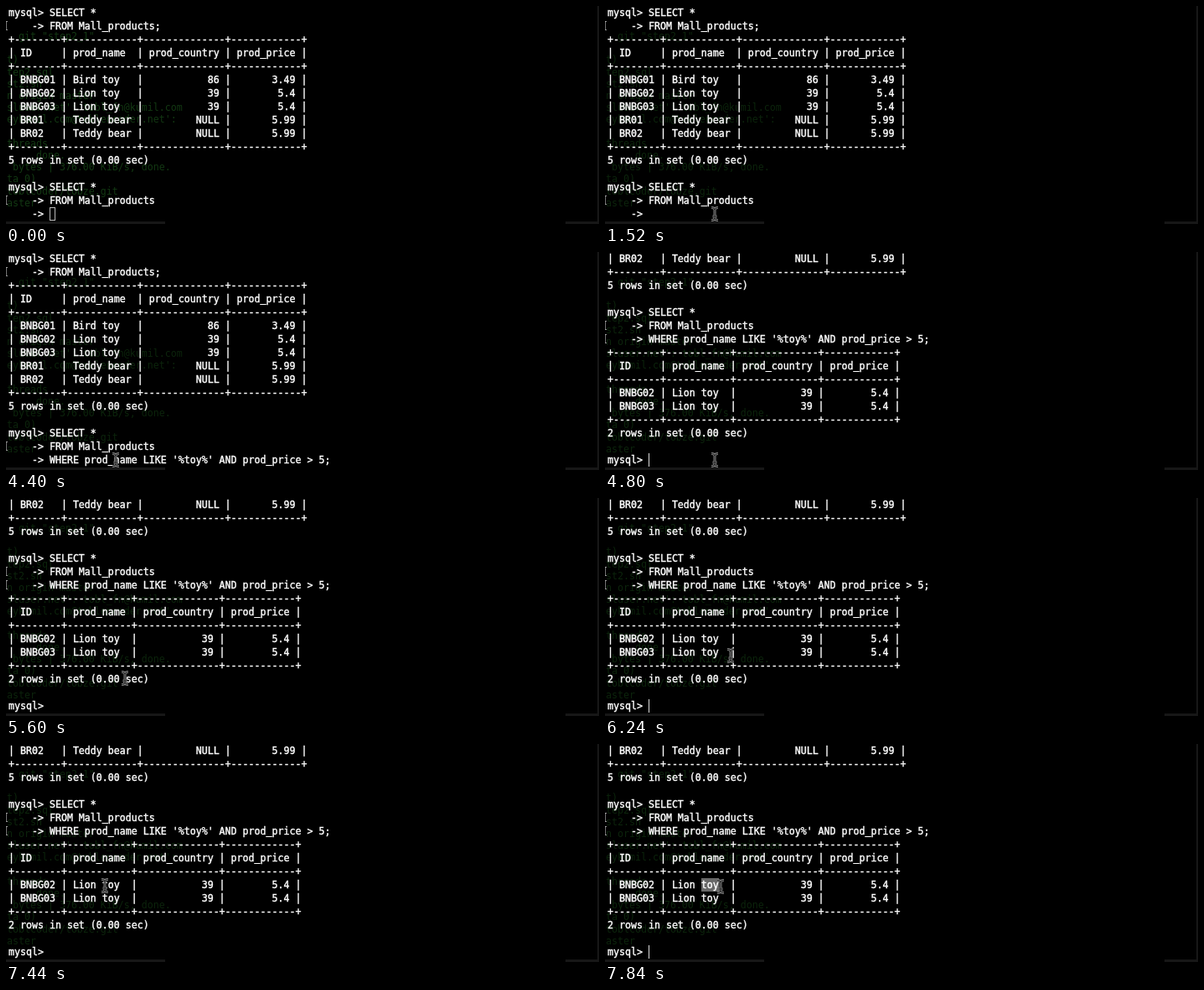
An HTML page that plays this animation: 708x260 px, repeating every 8 s.

```html
<!DOCTYPE html>
<html lang="en">
<head>
<meta charset="utf-8">
<title>Terminal session</title>
<style>
  html, body { margin: 0; width: 100%; height: 100%; overflow: hidden; background: #000; }
  #stage { position: relative; width: 708px; height: 260px; overflow: hidden; background: #000; }
  #stage > * { position: absolute; }
  pre { margin: 0; font: 11.628px/16px "DejaVu Sans Mono", monospace; }
  #backdrop { left: 1px; top: 29px; line-height: 14.2px; color: #123812; }
  .edge { background: #171717; }
  .foot { top: 257px; height: 3px; }
  #selection { left: 115px; top: 160px; height: 16px; background: #686868; }
  #screen { left: 3px; top: 0; color: #fff; -webkit-text-stroke: 0.4px #fff; }
  #marks { left: -3px; top: 0; color: #aaa; }
  #caret { top: 240px; height: 16px; box-sizing: border-box; }
  #mouse { left: -6px; top: -10px; fill: none; }
</style>
</head>
<body>
<div id="stage">
  <pre id="backdrop">  git "step2_1"

t)
tep2.sql
st2.sh
n origin master
sluser.net': tobl_fn@kumil.com
eykumil.com@toblencoder.net':

threads
     done.
 bytes | 376.00 KiB/s, done.
ta 0)
toblcoder/tobze.git
aster</pre>
  <div class="edge foot" style="left:0;width:190px"></div>
  <div class="edge foot" style="right:0;width:40px"></div>
  <div class="edge" style="right:0;width:2px;height:260px"></div>
  <div id="selection"></div>
  <pre id="marks"></pre>
  <pre id="screen"></pre>
  <div id="caret"></div>
  <svg id="mouse" width="12" height="20">
    <defs>
      <path id="beam" d="M2 2.5Q6 2.5 6 5Q6 2.5 10 2.5M6 4V16M3.5 13H8.5M2 17.5Q6 17.5 6 15Q6 17.5 10 17.5"/>
    </defs>
    <use href="#beam" stroke="#808080" stroke-width="3"/>
    <use href="#beam" stroke="#222"/>
  </svg>
</div>
<script>
const LOOP = 8000, STEP = 80, CHAR = 7, LEFT = 3;
const FOCUS = 320, PASTE = 1840, ENTER = 4800, DRAG = 7440;
const $ = id => document.getElementById(id);

function table(widths, rows) {
  const rule = '+' + widths.map(w => '-'.repeat(w + 2)).join('+') + '+';
  const line = (cells, numeric) => '| ' + cells.map((c, i) =>
    numeric && i > 1 ? c.padStart(widths[i]) : c.padEnd(widths[i])).join(' | ') + ' |';
  const head = ['ID', 'prod_name', 'prod_country', 'prod_price'];
  return [rule, line(head), rule, ...rows.map(r => line(r, true)), rule];
}

const lion2 = ['BNBG02', 'Lion toy', '39', '5.4'];
const lion3 = ['BNBG03', 'Lion toy', '39', '5.4'];
const query = "WHERE prod_name LIKE '%toy%' AND prod_price > 5;";
const before = [
  'mysql> SELECT *',
  '    -> FROM Mall_products;',
  ...table([6, 10, 12, 10], [
    ['BNBG01', 'Bird toy', '86', '3.49'], lion2, lion3,
    ['BR01', 'Teddy bear', 'NULL', '5.99'],
    ['BR02', 'Teddy bear', 'NULL', '5.99']]),
  '5 rows in set (0.00 sec)',
  '',
  'mysql> SELECT *',
  '    -> FROM Mall_products',
  '    -> '
];
const pasted = [...before.slice(0, -1), '    -> ' + query];
const after = [
  ...pasted,
  ...table([6, 9, 12, 10], [lion2, lion3]),
  '2 rows in set (0.00 sec)',
  '',
  'mysql> '
].slice(-16);

// Pointer stops: time, x, y
const path = [
  [320, 320, 252], [400, 250, 200], [480, 180, 160], [560, 146, 148],
  [960, 146, 148], [1200, 131, 248], [5280, 131, 248], [5840, 151, 191],
  [6160, 151, 191], [6240, 150, 188], [6880, 90, 170], [7040, 86, 169],
  [7280, 114, 169], [7360, 114, 169], [7840, 138, 170], [LOOP, 138, 170]
];

function pointer(t) {
  const i = Math.max(1, path.findIndex(p => p[0] >= t));
  const [t0, x0, y0] = path[i - 1], [t1, x1, y1] = path[i];
  const k = (t - t0) / (t1 - t0);
  return [x0 + (x1 - x0) * k, y0 + (y1 - y0) * k];
}

// Times at which the caret turns off or on
const toggles = [560, 1040, 1520, 1840, 2480, 2960, 3440, 3920, 4400, 4800,
  5360, 5840, 6320, 6800, 7280, 7760];

function setText(el, lines) {
  const text = lines.join('\n');
  if (el.textContent !== text) el.textContent = text;
}

function draw(now) {
  const t = Math.floor(now % LOOP / STEP) * STEP;
  const focused = t >= FOCUS, entered = t >= ENTER;
  const lines = entered ? after : t >= PASTE ? pasted : before;
  setText($('screen'), lines);

  const marked = entered ? [5, 6] : [1, 14];
  setText($('marks'), lines.map((_, i) => marked.includes(i) ? '[' : ''));
  $('backdrop').style.opacity = 1 - 0.35 * Math.min(1, Math.max(0, (t - 240) / 320));

  const caret = $('caret').style;
  caret.left = LEFT + CHAR * lines[lines.length - 1].length + 'px';
  caret.width = focused ? '1px' : '7px';
  caret.border = focused ? 'none' : '1px solid #bbb';
  caret.background = focused ? '#ddd' : 'none';
  caret.opacity = toggles.filter(x => x <= t).length % 2 ? 0 : 1;

  const [x, y] = pointer(t);
  $('mouse').style.transform = `translate(${Math.round(x)}px, ${Math.round(y)}px)`;
  $('mouse').style.opacity = focused ? 1 : 0;
  const chars = t >= DRAG ? Math.max(0, Math.round((x - 115) / CHAR)) : 0;
  $('selection').style.width = chars * CHAR + 'px';
}

const start = performance.now();
function tick() {
  draw(performance.now() - start);
  requestAnimationFrame(tick);
}
tick();
</script>
</body>
</html>
```
